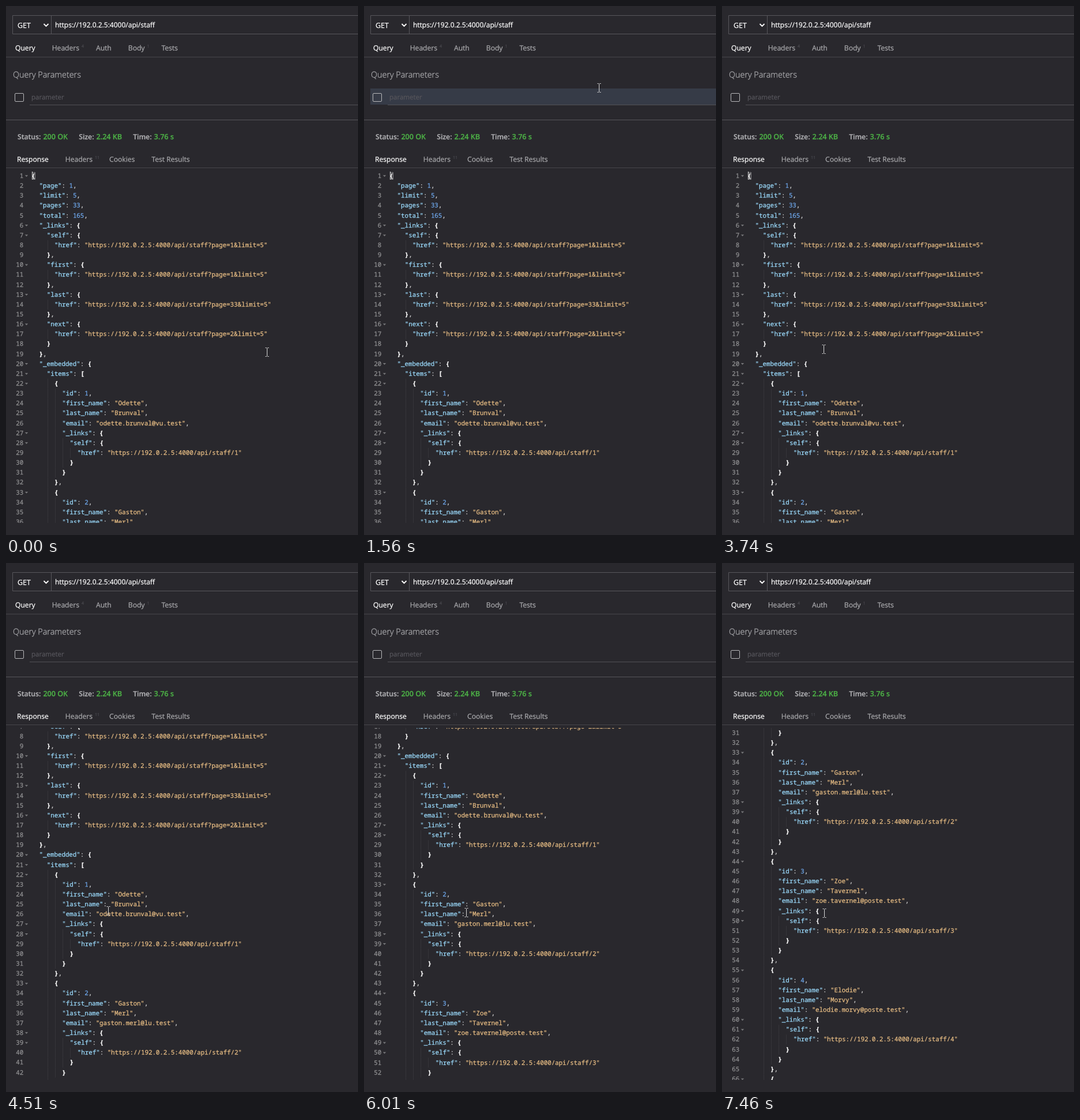
An HTML page that plays this animation: 610 by 917 pixels, repeating every 8 s.

```html
<!DOCTYPE html>
<html lang="en">
<head>
<meta charset="utf-8">
<title>API client</title>
<style>
  html, body { margin: 0; width: 100%; height: 100%; overflow: hidden; background: #29282d; }
  svg { display: block; }
  text { white-space: pre; text-rendering: geometricPrecision; }
  text, tspan { fill: currentColor; stroke: currentColor; stroke-width: .25; }
  .ui { font-family: "Open Sans", "Noto Sans", sans-serif; }
  .code { font: 500 10.8px "Noto Sans Mono", "DejaVu Sans Mono", monospace; color: #929294; }
  .key { color: #9cdcfe; }
  .string { color: #eabf85; }
  .number { color: #6fa9ee; }
  .bracket { color: #fff; font-weight: 600; }
  .mark { color: #d4d4d4; }
</style>
</head>
<body>
<svg id="stage" width="610" height="917" viewBox="0 0 610 917">
  <defs><clipPath id="editor"><rect y="286" width="610" height="610"/></clipPath></defs>
</svg>
<script>
const LOOP = 8000, LINE = 17.145, INDENT = 13.25, CODE_X = 44.3, NOTCH = LINE * 10 / 3;
const WHITE = '#fff', GREY = '#a9a9ac', GREEN = '#4caf46', FAINT = '#48474d';
const stage = document.getElementById('stage');

function add(parent, tag, attrs, content = '') {
  const node = document.createElementNS('http://www.w3.org/2000/svg', tag);
  for (const name in attrs) node.setAttribute(name, attrs[name]);
  node.textContent = content;
  return parent.appendChild(node);
}
const path = (d, stroke, width = 1, parent = stage) =>
  add(parent, 'path', { d, stroke, fill: 'none', 'stroke-width': width });

// Draws a text and returns its right edge.
function label(x, y, content, color = GREY, size = 12.1, weight = 400) {
  const attrs = { x, y, color, 'font-size': size, 'font-weight': weight, class: 'ui' };
  return x + add(stage, 'text', attrs, content).getComputedTextLength();
}

// The first tab is active; "name^n" carries a small count.
function tabs(x, y, names) {
  names.forEach((entry, i) => {
    const [name, count] = entry.split('^');
    const end = label(x, y, name, i ? GREY : WHITE);
    if (count) label(end + 4, y - 5, count, FAINT, 7);
    x = end + 29;
  });
}

// Request and response panels
const address = 'https://192.0.2.5:4000/api/staff';
const hover = add(stage, 'rect', { x: 11, y: 143, width: 599, height: 28, fill: '#363b47' });
path('M611 16.5H11.5V48.5H611M78.5 16.5V48.5', '#58575c');
label(20, 37.5, 'GET', WHITE, 12.4);
path('M65.5 31l4 4 4-4', WHITE, 1.8);
label(85, 37.2, address, WHITE, 12);
tabs(16, 77, ['Query', 'Headers^4', 'Auth', 'Body^1', 'Tests']);
path('M0 88.5H610M0 280.5H610', '#47464b');
label(12, 124.3, 'Query Parameters', '#b4b4b7', 14.4, 300);
add(stage, 'rect', { x: 15.5, y: 151.5, width: 15, height: 14, rx: 1.5, fill: 'none', stroke: '#b8b8ba' });
label(44, 162, 'parameter', '#56555b', 11.5);
path('M41 171.5H610', '#525156');
path('M0 197.5H610', '#57565b');

let statX = 20;
for (const [name, value] of Object.entries({ Status: '200 OK', Size: '2.24 KB', Time: '3.76 s' })) {
  const end = label(statX, 230.5, name + ':', '#b0b0b3', 12.2, 600);
  statX = label(end + 4, 230.5, value, GREEN, 12.6, 600) + 19;
}
tabs(19, 269.6, ['Response', 'Headers^11', 'Cookies', 'Test Results']);

// Response body
const link = query => ({ href: address + query });
const pageLink = n => link(`?page=${n}&limit=5`);
const people = [
  ['Odette', 'Brunval', 'vu.test'],
  ['Gaston', 'Merl', 'lu.test'],
  ['Zoe', 'Tavernel', 'poste.test'],
  ['Elodie', 'Morvy', 'poste.test']
].map(([first, last, host], i) => ({
  id: i + 1,
  first_name: first,
  last_name: last,
  email: `${first}.${last}@${host}`.toLowerCase(),
  _links: { self: link('/' + (i + 1)) }
}));
const body = {
  page: 1, limit: 5, pages: 33, total: 165,
  _links: { self: pageLink(1), first: pageLink(1), last: pageLink(33), next: pageLink(2) },
  _embedded: { items: [...people, { id: 5 }] }
};

const clip = add(stage, 'g', { 'clip-path': 'url(#editor)' });
const sheet = add(clip, 'g', { class: 'code' });

function tokenClass(token, rest) {
  if (token[0] === '"') return rest[0] === ':' ? 'key' : 'string';
  if (/\d/.test(token)) return 'number';
  return /[{}[\]]/.test(token) ? 'bracket' : 'mark';
}

JSON.stringify(body, null, 2).split('\n').slice(0, 66).forEach((line, i) => {
  const code = line.trim(), depth = (line.length - code.length) / 2, y = 298 + i * LINE;
  add(sheet, 'text', { x: 30.2, y, 'text-anchor': 'end' }, i + 1);
  if (/[{[]$/.test(code)) add(sheet, 'path', { d: `M32.8 ${y - 4.7}h5.4l-2.7 3z`, fill: '#77777a' });
  for (let k = 2; k < depth; k++) path(`M${Math.round(45 + k * INDENT) + .5} ${y - 12}v${LINE}`, '#36353a', 1, sheet);
  const row = add(sheet, 'text', { x: CODE_X + depth * INDENT, y });
  for (const match of code.matchAll(/"[^"]*"|\d+|[{}[\]]|[:, ]+/g)) {
    const token = match[0];
    add(row, 'tspan', { class: tokenClass(token, code.slice(match.index + token.length)) }, token);
  }
});
path('M45.5 288.5h5v12h-5z', '#858588', 1, sheet);
path('M45.5 287v14', '#e4e4e4', 1, sheet);

const pointer = path('M-3-7.5H-1L0-6.5 1-7.5H3M0-6.5V6.5M-3 7.5H-1L0 6.5 1 7.5H3', '#d8d8d8');

// The screen refreshes in ticks; the pointer speeds up between key points [tick, x, y].
const TICK = 128.3, FIRST_TICK = 505;
const keys = [
  [-1, 452, 600], [0, 437, 548], [4, 506, 149], [5, 473, 96], [6, 475, 93], [10, 202, 290],
  [13, 189, 407], [17, 215, 437], [20, 196, 425], [23, 176, 594], [31, 177, 603], [43, 177, 607]
];
const wheelTimes = [3860, 4510, 4630, 5610, 6010, 6810, 7060, 7340, 7460];

function pointerAt(time) {
  const tick = Math.floor((time - FIRST_TICK) / TICK);
  const next = keys.findIndex(key => key[0] > tick);
  if (next < 0) return keys.at(-1).slice(1);
  const to = keys[next], from = keys[next - 1] ?? to;
  const part = from === to ? 0 : (tick - from[0]) / (to[0] - from[0]);
  return [1, 2].map(axis => Math.round(from[axis] + (to[axis] - from[axis]) * part ** 2));
}

function draw() {
  const time = performance.now() % LOOP;
  const [x, y] = pointerAt(time);
  const notches = wheelTimes.filter(t => t <= time).length;
  pointer.setAttribute('transform', `translate(${x + .5} ${y})`);
  sheet.setAttribute('transform', `translate(0 ${-notches * NOTCH})`);
  hover.setAttribute('visibility', y > 136 && y < 172 ? 'visible' : 'hidden');
  requestAnimationFrame(draw);
}
draw();
</script>
</body>
</html>
```
